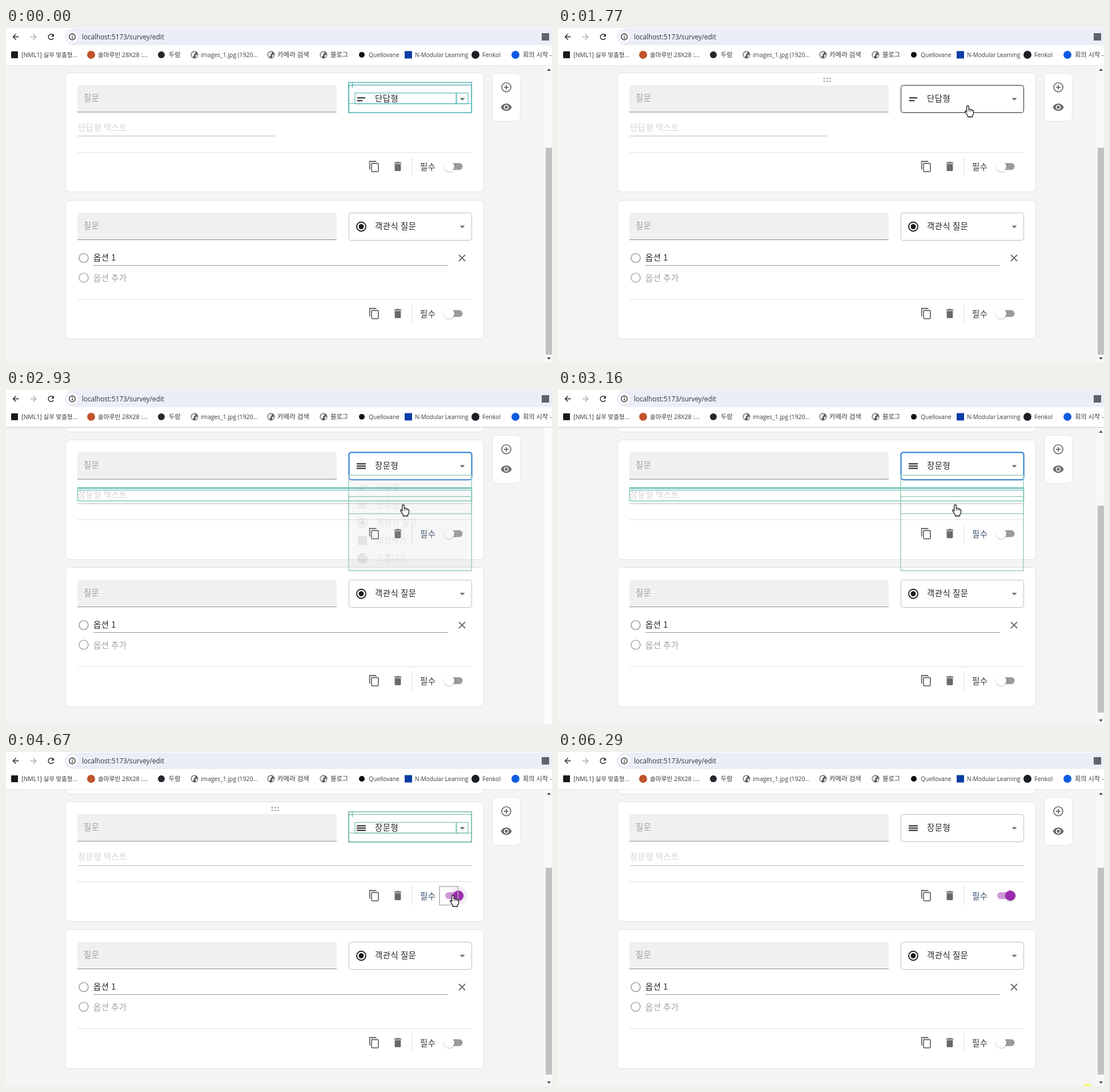
Write an HTML page with a canvas that moves like this. It is 956 px wide and 586 px high and loops after 6.42 s.

```html
<!DOCTYPE html>
<html lang="ko">
<head>
<meta charset="utf-8">
<title>Survey editor</title>
<style>
html, body { margin: 0; width: 100%; height: 100%; overflow: hidden; background: #f4f4f4; }
canvas { display: block; width: 956px; height: 586px; }
</style>
</head>
<body>
<canvas id="stage" width="956" height="586"></canvas>
<script>
const ctx = document.getElementById('stage').getContext('2d');
const LOOP = 6420, OPEN = 1840, PICK = 2740, CLOSED = 2950, RESUME = 3430, PRESS = 4250, TOGGLE = 4390, LEAVE = 4940;
const KR = '"Noto Sans CJK KR", "Noto Sans CJK", sans-serif';
const UI = '"Open Sans", ' + KR;
const TEAL = '#5cb9b9', GREEN = '#a2d1bd', DARK = '#1c1c1c', GREY = '#6a6a6a';

const clamp = v => Math.max(0, Math.min(1, v));
const ease = v => v * v * (3 - 2 * v);
const inside = (p, x, y, w, h) => p && p.x >= x && p.x <= x + w && p.y >= y && p.y <= y + h;

function rect(x, y, w, h, color) {
  ctx.fillStyle = color;
  ctx.fillRect(x, y, w, h);
}
function round(x, y, w, h, r, fill, stroke, width = 1) {
  ctx.beginPath();
  ctx.roundRect(x, y, w, h, r);
  if (fill) { ctx.fillStyle = fill; ctx.fill(); }
  if (stroke) { ctx.strokeStyle = stroke; ctx.lineWidth = width; ctx.stroke(); }
}
function frame(x, y, w, h, color, width = 1.6) {
  ctx.strokeStyle = color;
  ctx.lineWidth = width;
  ctx.strokeRect(x, y, w, h);
}
function disc(x, y, r, color) {
  ctx.beginPath();
  ctx.arc(x, y, r, 0, 7);
  ctx.fillStyle = color;
  ctx.fill();
}
function ring(x, y, r, color, width = 1.7) {
  ctx.beginPath();
  ctx.arc(x, y, r, 0, 7);
  ctx.strokeStyle = color;
  ctx.lineWidth = width;
  ctx.stroke();
}
function line(points, color, width = 1.8) {
  ctx.beginPath();
  points.forEach(([x, y]) => ctx.lineTo(x, y));
  ctx.strokeStyle = color;
  ctx.lineWidth = width;
  ctx.stroke();
}
function shape(d, x, y, fill, stroke, width = 1.1) {
  ctx.save();
  ctx.translate(x, y);
  const path = new Path2D(d);
  ctx.fillStyle = fill;
  ctx.fill(path);
  if (stroke) { ctx.strokeStyle = stroke; ctx.lineWidth = width; ctx.stroke(path); }
  ctx.restore();
}
// y is the vertical middle of the text
function text(str, x, y, color = '#222', size = 14.4, family = KR, spacing = 0.5) {
  ctx.font = `${size}px ${family}`;
  ctx.letterSpacing = spacing + 'px';
  ctx.fillStyle = color;
  ctx.fillText(str, x, y + size * 0.37);
}

/* ---- icons, placed by their centre ---- */
const icons = {
  short(x, y) { rect(x - 7, y - 3, 14, 2, DARK); rect(x - 7, y + 2, 9, 2, DARK); },
  long(x, y) { for (const d of [-5, -1, 3]) rect(x - 8, y + d, 16, 2, DARK); },
  radio(x, y) { ring(x, y, 8, DARK, 1.8); disc(x, y, 4.5, DARK); },
  box(x, y) { round(x - 8, y - 8, 16, 16, 2, DARK); tick(x, y); },
  check(x, y) { disc(x, y, 9, DARK); tick(x, y); }
};
function tick(x, y) {
  line([[x - 5, y], [x - 1.7, y + 3.5], [x + 5, y - 3.7]], '#fff', 2);
}
function caret(x, y, up) {
  const d = up ? -2.3 : 2.3;
  shape(`M-4.5 ${-d}H4.5L0 ${d}Z`, x, y, '#6f6f6f');
}
function copyIcon(x, y) {
  round(x - 4, y - 5.5, 12, 14.6, 1.5, null, GREY, 1.8);
  line([[x - 7.3, y + 5], [x - 7.3, y - 9], [x + 4.5, y - 9]], GREY);
}
function trashIcon(x, y) {
  round(x - 5.4, y - 4.5, 10.8, 12.5, [0, 0, 1.8, 1.8], GREY);
  shape('M-6.3-5.5V-7.3H-3.2L-2.3-8.2H2.3L3.2-7.3H6.3V-5.5Z', x, y, GREY);
}
function globe(x, y) {
  disc(x, y, 6.5, '#5b5f63');
  shape('M-5-2Q-2-6 1-5L2-3L-1-1L0 1L-2 2L-3 5Q-6 2-5-2ZM2 1L5-1Q6 3 2 5Z', x, y, '#f2f2f2');
}

/* ---- browser bars ---- */
function arrow(x, y, dir, color) {
  line([[x - 5 * dir, y], [x + 5 * dir, y]].reverse(), color, 1.6);
  line([[x, y - 5], [x + 5 * dir, y], [x, y + 5]], color, 1.6);
}
function browser(modal) {
  rect(0, 0, 956, 66, '#fff');
  round(103, 1, 880, 29, 14.5, '#ebeef8');
  arrow(17.5, 15.5, -1, '#333');
  arrow(47.5, 15.5, 1, '#b0b0b0');
  ctx.beginPath();
  ctx.arc(79, 15.5, 4.8, 0.5, 5.5);
  ctx.strokeStyle = '#333';
  ctx.lineWidth = 1.6;
  ctx.stroke();
  shape('M5-5.5V-.5H0Z', 79, 15.5, '#333');
  disc(116, 15.5, 10, '#fff');
  ring(116, 15.5, 5.3, '#333', 1.4);
  rect(115.3, 14.8, 1.5, 3.8, '#333');
  rect(115.3, 12.2, 1.5, 1.5, '#333');
  text('localhost:5173/survey/edit', 133, 15.3, '#303236', 11.7, UI, 0);
  rect(938, 9, 13, 13, '#5f6368');

  const y = 47;
  round(9, y - 6, 12, 12, 1, '#1b1b1b');
  disc(149, y, 7, '#c1532d');
  disc(272, y, 6, '#24272d');
  for (const x of [330, 464, 556]) globe(x, y);
  disc(623, y, 5, '#111');
  round(698, y - 6.5, 13, 13, 1, '#0c3da6');
  disc(822, y, 7, '#1c2024');
  disc(892, y, 7, '#0d5be0');
  const marks = [
    ['[NML1] 실무 맞춤형...', 27, 10.5], ['솔마루빈 28X28 :...', 161, 10.7], ['두람', 285, 11.2],
    ['images_1.jpg (1920...', 341, 10.3], ['카메라 검색', 475, 11.5], ['블로그', 568, 11.3],
    ['Quellovane', 635, 10.2], ['N-Modular Learning', 716, 10], ['Fenkol', 834, 10.5], ['회의 시작 -', 905, 11.2]
  ];
  for (const [label, x, size] of marks) text(label, x, y, '#3a3a3a', size, UI, 0);
  rect(0, 65, 956, 1, modal ? '#c6c6c6' : '#e9e9e9');
}

function scrollbar(t, shifted) {
  if (t >= OPEN && t < CLOSED) {
    rect(943, 66, 13, 520, '#fcfcfc');
    return;
  }
  rect(943, 66, 13, 520, '#f8f8f8');
  rect(945, shifted ? 203 : 210, 11, 363, '#c1c1c1');
  shape('M-3.5 2H3.5L0-2Z', 950.5, 73, '#505050');
  shape('M-3.5-2H3.5L0 2Z', 950.5, 580, '#505050');
}

/* ---- survey form ---- */
function select(y, kind, label, state) {
  const looks = { focus: ['#1f76d2', 2], open: ['#1f76d2', 2], hover: ['#222', 1], idle: ['#bdbdbd', 1] };
  round(600.5, y + 0.5, 215, 48, 4, '#fff', ...looks[state]);
  icons[kind](622, y + 24.5);
  text(label, 646, y + 24);
  caret(799, y + 25, state === 'open');
}

function toggle(y, on, halo) {
  const x = 776 + 16 * on;
  round(769, y - 6, 30.5, 12, 6, on > 0.5 ? '#cf9ad9' : '#9b9b9b');
  if (halo) disc(x, y, 16, 'rgba(156,39,176,.09)');
  ctx.save();
  ctx.shadowColor = 'rgba(0,0,0,.25)';
  ctx.shadowBlur = 3;
  ctx.shadowOffsetY = 1;
  disc(x, y, 9, on > 0.5 ? '#9a2bae' : '#fff');
  ctx.restore();
}

function footer(y, on = 0, halo = false, color = '#333') {
  rect(125, y, 691, 1, '#e1e1e1');
  copyIcon(644, y + 25);
  trashIcon(686, y + 25);
  rect(710, y + 8, 1, 34, '#dedede');
  text('필수', 725, y + 25.5, color);
  toggle(y + 25, on, halo);
}

function cardBase(y, h, dots) {
  round(104.5, y + 0.5, 732, h, 6.5, '#fff', '#e1e1e1');
  round(125, y + 22, 454, 47, [4, 4, 0, 0], '#f0f0f0');
  rect(125, y + 69, 454, 1, '#8c8c8c');
  text('질문', 136, y + 44.5, '#9d9d9d');
  if (dots) for (let i = 0; i < 6; i++) disc(466 + i % 3 * 5, y + 10.5 + (i > 2 ? 5 : 0), 1.6, '#a9afa9');
}

function form(t, p) {
  const shifted = t >= PICK, dy = shifted ? 9 : 0, grow = shifted ? 1 : 0;
  const modal = t >= OPEN && t < RESUME;
  const mouse = modal ? null : p;
  const a = 78 + dy, b = 302 + dy;
  const hover = y => inside(mouse, 600, y + 22, 216, 49);

  rect(0, 66, 956, 520, '#f4f4f4');
  if (shifted) round(104.5, 20, 732, 53.5, 6.5, '#fff', '#e1e1e1');

  cardBase(a, 209 + grow, inside(mouse, 104, a, 733, 210));
  const state = t >= OPEN && t < PICK ? 'open' : t >= PICK && t < PRESS ? 'focus' : hover(a) ? 'hover' : 'idle';
  select(a + 22, shifted ? 'long' : 'short', shifted ? '장문형' : '단답형', state);
  text(shifted ? '장문형 텍스트' : '단답형 텍스트', 126, a + 97, '#d2d2d2');
  ctx.setLineDash([1, 1]);
  line([[126, a + 111.5 + grow], [shifted ? 816 : 471, a + 111.5 + grow]], '#777', 1);
  ctx.setLineDash([]);
  footer(a + 140, ease(clamp((t - TOGGLE) / 140)), t >= TOGGLE && t < LEAVE + 70, shifted ? '#34486a' : '#333');

  cardBase(b, 243 + grow, inside(mouse, 104, b, 733, 244));
  select(b + 22, 'radio', '객관식 질문', hover(b) ? 'hover' : 'idle');
  ring(136, b + 101.5, 8, '#a6a6a6');
  text('옵션 1', 153, b + 101);
  rect(153, b + 114, 621, 1, '#989898');
  const cy = b + 101.5;
  line([[793, cy - 5.5], [804, cy + 5.5]], GREY);
  line([[804, cy - 5.5], [793, cy + 5.5]], GREY);
  ring(136, b + 136, 8, '#b0b0b0');
  text('옵션 추가', 153, b + 136.5, '#a0a0a0');
  footer(b + 174);

  round(851.5, 79.5, 49, 84, 7, '#fff', '#e5e5e5');
  ring(876, 104, 8, GREY);
  line([[872, 104], [880, 104]], GREY);
  line([[876, 100], [876, 108]], GREY);
  shape('M-9.5 0C-6-8.6 6-8.6 9.5 0C6 8.6-6 8.6-9.5 0Z', 876, 139, GREY);
  ring(876, 139, 3.5, '#fff', 1.7);

  scrollbar(t, shifted);
}

function menu(t, p) {
  if (t < OPEN + 70 || t >= CLOSED) return;
  const grow = ease(clamp((t - OPEN) / 280));
  const fade = 1 - clamp((t - PICK) / (CLOSED - PICK));
  const items = [['short', '단답형'], ['long', '장문형'], ['radio', '객관식 질문'], ['box', '체크박스'], ['check', '드롭다운']];
  ctx.save();
  ctx.globalAlpha = grow * fade;
  ctx.translate(708, 149);
  ctx.scale(0.75 + 0.25 * grow, 0.56 + 0.44 * grow);
  ctx.translate(-708, -149);
  ctx.save();
  ctx.shadowColor = 'rgba(0,0,0,.38)';
  ctx.shadowBlur = 8;
  ctx.shadowOffsetY = 3;
  round(600, 150, 215, 167, 3, '#fff');
  ctx.restore();
  items.forEach(([kind, label], i) => {
    const y = 155.5 + i * 31;
    if (i === 0) rect(600, y, 215, 31, '#ebf2fb');
    else if (inside(p, 600, y, 215, 31)) rect(600, y, 215, 31, '#f5f5f5');
    icons[kind](624, y + 15.5);
    text(label, 648, y + 15);
  });
  frame(600, 149.5, 215.5, 168, '#a9cfae', 1.2);
  ctx.restore();
}

/* ---- render highlights ---- */
function selectMarks(y, color) {
  frame(599.7, y - 4.5, 215.6, 53, color);
  frame(600, y, 215, 48.5, color, 1.2);
  frame(611, y + 14, 177, 19, color, 1.2);
  frame(789, y + 14, 20, 19, color, 1.2);
  line([[600, y + 32.5], [815, y + 32.5]], color, 1.2);
  line([[606.5, y - 4], [606.5, y + 4.5]], color, 1.6);
}
function highlights(t) {
  if (t < 130) selectMarks(100, TEAL);
  if (t >= 2810 && t < 3230) {
    frame(600, 149.5, 215, 167.5, GREEN);
    frame(600, 187, 215, 30, GREEN);
    frame(125.5, 175.5, 690, 19, '#7fcbbc');
    line([[125, 172], [816, 172]], '#50b3a4', 2);
  }
  if (t >= PRESS && t < 4870) {
    selectMarks(109.5, t < TOGGLE ? '#62bcb2' : '#78bfad');
    frame(759, 236, 32.5, 32.5, t < 4530 ? '#80c6c0' : '#b4b4b4');
  }
  if (t >= TOGGLE && t < 4530) {
    frame(104.5, 88, 732, 209.5, GREEN, 1.4);
    frame(104.5, 312, 732, 243, GREEN, 1.4);
  }
}

/* ---- pointer ---- */
// start, end, steps, destination
const moves = [
  [530, 1160, 10, 724, 142], [1230, 1700, 7, 717.5, 136], [1910, 2390, 8, 696.5, 198],
  [2600, 2740, 3, 695.5, 201], [3430, 4050, 10, 782.5, 251], [4940, 5340, 7, 897, 496], [5600, 6020, 7, 923, 590]
];
function pointer(t) {
  if (t < 530) return null;
  let x = 885, y = 546;
  for (const [start, end, steps, tx, ty] of moves) {
    if (t < start) break;
    const u = ease(clamp((Math.floor((t - start) / (end - start) * (steps - 1)) + 1) / steps));
    x += (tx - x) * u;
    y += (ty - y) * u;
  }
  return { x, y };
}
function drawPointer(t, p) {
  if (!p) return;
  const dy = t >= PICK ? 9 : 0;
  const hand = t >= OPEN && t < RESUME || inside(p, 759, 235, 50, 34) ||
    [100, 324].some(y => inside(p, 600, y + dy, 216, 49));
  if (hand) {
    shape('M-1.8 1.5Q0-1 1.8 1.5V7Q4 5.5 5 7.5Q7 6.3 7.8 8.5Q10 7.8 10 10.5V13Q9.8 16 8 18V20H0V18L-4.5 11.5Q-5.5 8.5-3 9.5L-1.8 11Z', p.x, p.y, '#fff', '#16161c', 1.3);
    for (const d of [2.2, 5, 7.6]) line([[p.x + d, p.y + 8], [p.x + d, p.y + 11]], '#333', 0.8);
  } else {
    shape('M0 0V16L3.7 12.5L6.2 18L8.6 17L6.2 11.6H11.2Z', p.x, p.y, '#fff', '#111', 1);
  }
}

function draw(t) {
  const p = pointer(t);
  form(t, p);
  menu(t, p);
  highlights(t);
  browser(t >= OPEN && t < RESUME + 70);
  drawPointer(t, p);
  if (t >= 6290) disc(927, 592, 10, '#fbf96a');
}

const began = performance.now();
function tick60(now) {
  draw(Math.max(0, now - began) % LOOP);
  requestAnimationFrame(tick60);
}
draw(0);
requestAnimationFrame(tick60);
</script>
</body>
</html>
```
